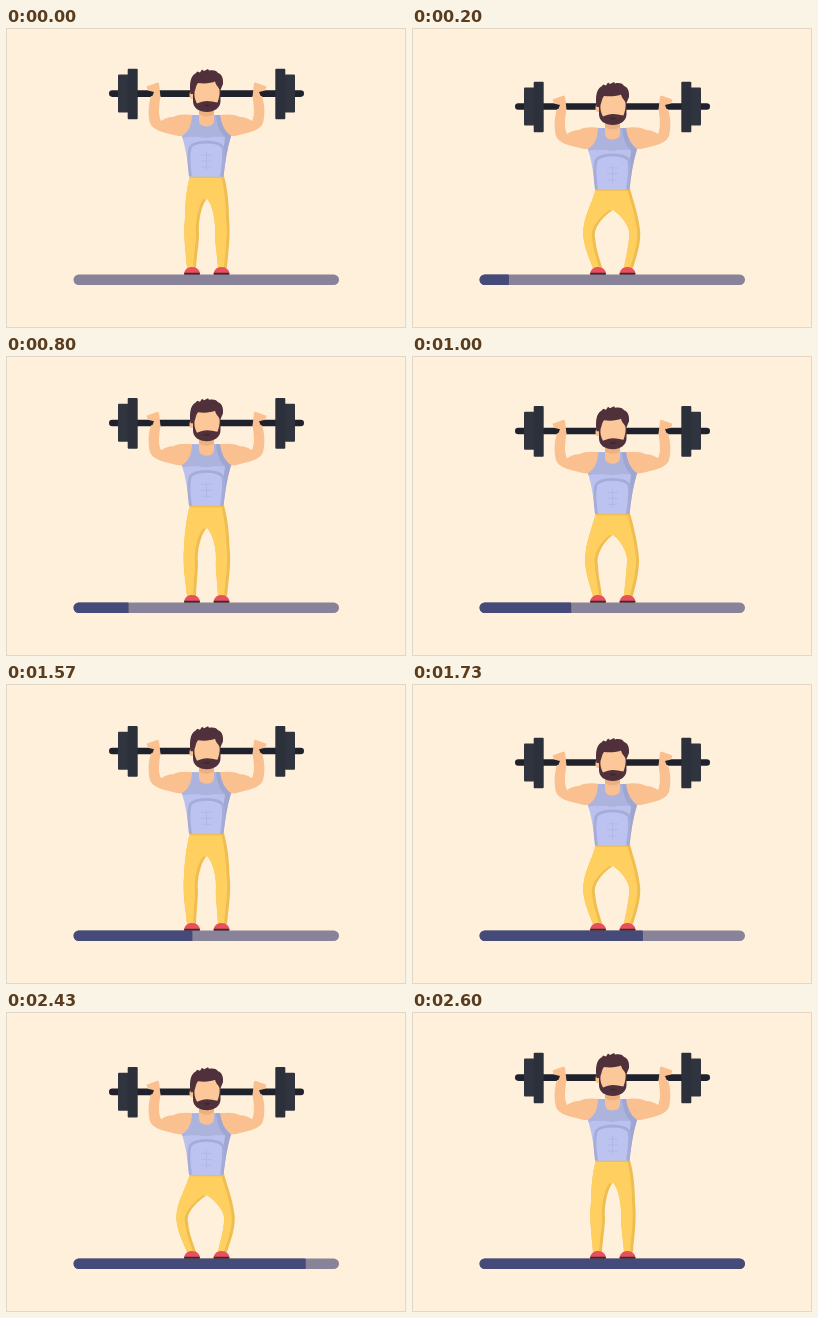
These frames come from a looping animation (400 px wide and 300 px high, 3.03 s). An HTML page:

```html
<!DOCTYPE html>
<html lang="en">
<head>
<meta charset="utf-8">
<title>Barbell squats</title>
<style>
html, body { margin: 0; width: 100%; height: 100%; overflow: hidden; background: #fff0dc; }
svg { display: block; width: 400px; height: 300px; }
</style>
</head>
<body>
<svg viewBox="0 0 400 300">
  <defs>
    <path id="legs"/>
    <clipPath id="legsClip"><use href="#legs"/></clipPath>
    <clipPath id="trackClip"><rect x="67.5" y="246.5" width="265.5" height="10.5" rx="5.25"/></clipPath>
    <g id="plates">
      <rect x="112" y="46.5" width="10.5" height="38" rx="1" fill="#30343f"/>
      <rect x="121.7" y="40.7" width="10" height="50.6" rx="1" fill="#2c303b"/>
    </g>
    <g id="arm" fill="#fac090">
      <path d="M188 87C180 86 172 86 167 89C162 89 158 91 155 93C152 87 153 78 154.500 68L145 68C142 77 142 87 144 95C147 102 156 104 164 106C170 108 176 109 186 107Z"/>
      <path d="M140.500 58.500L151.500 54.500Q153.500 54.500 153.200 57L154.500 69L145.500 70L148 64L142 62.500Z"/>
    </g>
    <g id="shoe">
      <path d="M178 245.500C179 241 182 239 186 239C191 239 193.500 242 194 245.500Z" fill="#e9505c"/>
      <rect x="178" y="244.800" width="16" height="2" rx=".8" fill="#3c2b37"/>
    </g>
  </defs>

  <rect x=".5" y=".5" width="399" height="299" fill="none" stroke="#e3d8c8"/>

  <g clip-path="url(#trackClip)">
    <rect x="67" y="246" width="267" height="12" fill="#888398"/>
    <rect id="progress" x="60" y="246" height="12" rx="1.500" fill="#454a78"/>
  </g>

  <use href="#legs" fill="#f0bd50"/>
  <g clip-path="url(#legsClip)"><use href="#legs" x="-3" fill="#ffd05f"/></g>
  <use href="#shoe"/>
  <use href="#shoe" x="29.500"/>

  <g id="body">
    <rect x="103" y="62.300" width="195" height="6.600" rx="3.300" fill="#1f222c"/>
    <use href="#plates"/>
    <use href="#plates" transform="matrix(-1 0 0 1 401 0)"/>
    <use href="#arm"/>
    <use href="#arm" transform="matrix(-1 0 0 1 401 0)"/>

    <rect x="184" y="148" width="34" height="2" fill="#f0bd50"/>
    <path d="M186 87H214C215 96 219 104 225 108C221 121 219 135 217.500 148.500H183C182 135 180 121 176 108C183 104 186 96 186 87Z" fill="#bac1ee"/>
    <path d="M186 87H214C215 96 219 104 225 108L224 110C213 108 208 109 200.500 110C193 109 186 108 176.500 110L176 108C183 104 186 96 186 87Z" fill="#acb3dc"/>
    <path d="M210 87H214C215 96 219 104 225 108C221 121 219 135 217.500 148.500H214C215 134 218 120 219 109C213 104 211 96 210 87Z" fill="#a0a6d2"/>
    <path d="M184.500 148.500C183 138 182 127 184 120C187 112 214 112 217 120C218.500 127 217 138 215.500 148.500" fill="#bcc3f1" stroke="#a5acd8" stroke-width="2.800"/>
    <path d="M195 127H206M195 133H206M196 139H205M200.500 124V142" stroke="#b1b8e7" fill="none"/>
    <path d="M193 80H208V92Q208 98.500 200.500 98.500Q193 98.500 193 92Z" fill="#fac090"/>
    <path d="M193 82H208V86Q200.500 91 193 86Z" fill="#eeb07f"/>

    <ellipse cx="186" cy="67" rx="2.500" ry="4" fill="#fac090"/>
    <path d="M184.500 66C183.500 58 184 51 187 47.500C189 45 190 46 191 43.500L194 44.500L196 41.500L198 43L202 41L203 42.500C208 41.500 211 43 212 45C216 46 217.500 51 217 56L214.500 62V73C214.500 80 208 84 201 84C193 84 187 80 187 73V66Z" fill="#50303b"/>
    <path d="M188.500 64C190 60 190 57 192 55C199 56 206 55 209 53.500C210 58 213 59 213.500 62C214 66 213 70 211.500 74.500C207 74 205 73 201 73C197 73 195 74 191 75.500C189 72 188 68 188.500 64Z" fill="#fdc899"/>
    <path d="M197.500 77.500Q201 75.800 204.500 77.500Q201 79.500 197.500 77.500Z" fill="#3e252e"/>
  </g>
</svg>
<script>
const FRAME = 100 / 3, LOOP = 3030, DEPTH = 14.3, REP = 10;
const starts = [0, 23, 46, 68];               // first step of each repetition
const stops = [67.5, 116.5, 177.5, 266.5, 333]; // progress edge between repetitions

const straight = "M184 148C180 162 179 180 179 190C177 208 180 225 181 240L190 240C191 225 193 215 193 206C192 195 195 177 201 170.5L201 148Z";
const bentLeft = "M184 162C180 176 173 186 171 199C168 212 176 228 181 240L190 240C187 230 183 222 182 210C180 203 187 192 201 183L201 162Z";
const bentRight = "M184 162C180 176 176 186 174 199C171 212 177 228 181 240L190 240C188 230 185 222 184 210C182 203 188 192 201 183L201 162Z";

const get = id => document.getElementById(id);
const legs = get("legs"), body = get("body"), progress = get("progress");

function blend(from, to, amount, mirror) {
  const goal = to.match(/[\d.]+/g);
  let i = 0;
  return from.replace(/[\d.]+/g, n => {
    const value = +n + (goal[i] - n) * amount;
    return mirror && i++ % 2 === 0 ? 402 - value : (mirror || i++, value);
  });
}

function draw(now) {
  const step = Math.floor((now % LOOP + 7) / FRAME);
  const rep = starts.findLastIndex(s => step >= s);
  const p = Math.min(1, (step - starts[rep]) / REP);
  const bend = Math.sin(Math.PI * p) ** 2;

  body.setAttribute("transform", `translate(0 ${DEPTH * bend})`);
  legs.setAttribute("d", blend(straight, bentLeft, bend) + blend(straight, bentRight, bend, true));
  const edge = stops[rep] + (stops[rep + 1] - stops[rep]) * p;
  progress.setAttribute("width", edge > 67.5 ? edge - 60 : 0);
}

const begin = performance.now();
(function tick() {
  draw(performance.now() - begin);
  requestAnimationFrame(tick);
})();
</script>
</body>
</html>
```
